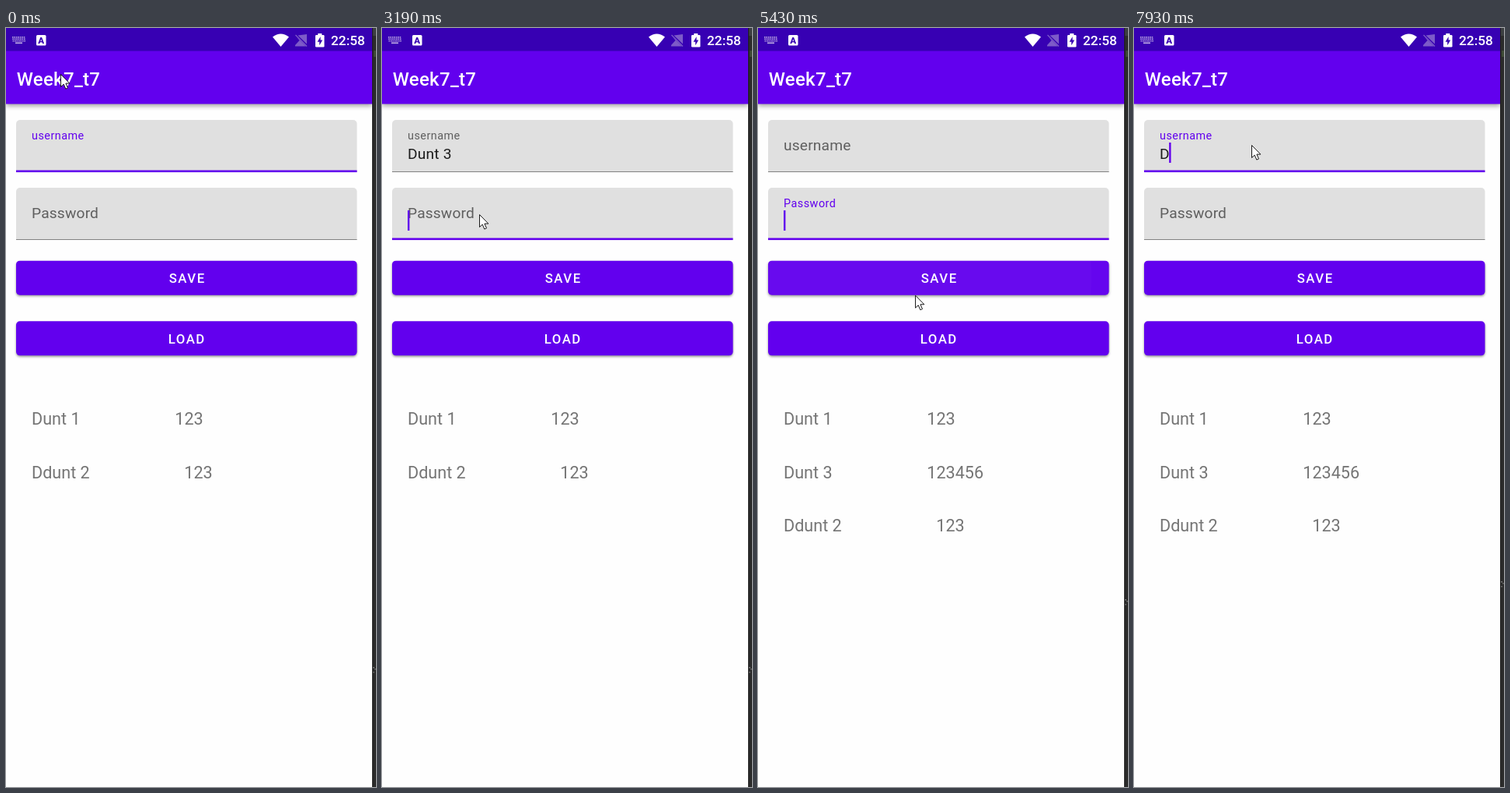
Write an HTML page with a canvas that moves like this. It is 476 px wide and 974 px high and loops after 8000 ms.

```html
<!DOCTYPE html>
<html lang="en">
<head>
<meta charset="utf-8">
<title>Login form</title>
<style>
html, body { margin: 0; width: 100%; height: 100%; overflow: hidden; background: #fefefe; }
canvas { display: block; }
</style>
</head>
<body>
<canvas id="stage" width="476" height="974"></canvas>
<script>
const ctx = document.getElementById('stage').getContext('2d');
const LOOP = 8000, PRIMARY = '#6200ee', FONT = 'Roboto, sans-serif';

// Each step: start time, username, password, focused field (0 or 1).
// A step also restarts the caret blink.
const steps = [
  [-720, '', '', 0],
  [1150, 'D', '', 0], [1240, 'Dd', '', 0], [1330, 'Ddu', '', 0], [1550, 'Ddun', '', 0],
  [1840, 'Ddu', '', 0], [1980, 'Dd', '', 0], [2160, 'D', '', 0], [2220, 'Du', '', 0],
  [2370, 'Dun', '', 0], [2400, 'Dunt', '', 0], [2550, 'Dunt ', '', 0], [2710, 'Dunt 3', '', 0],
  [3180, 'Dunt 3', '', 1], [3390, 'Dunt 3', '1', 1], [3450, 'Dunt 3', '12', 1],
  [3510, 'Dunt 3', '123', 1], [3810, 'Dunt 3', '1234', 1], [4000, 'Dunt 3', '12345', 1],
  [4190, 'Dunt 3', '123456', 1], [4980, 'Dunt 3', '123456', 1],
  [5005, '', '', 1],
  [7010, '', '', 0], [7500, 'D', '', 0], [7550, 'Di', '', 0], [7930, 'D', '', 0]
];

// Pointer path: time, x, y
const path = [
  [30, 70, 59], [440, 105, 161], [2720, 105, 161], [3080, 125, 239], [4190, 125, 239],
  [4550, 176, 314], [4850, 203, 323], [5400, 203, 323], [5810, 190, 583], [5990, 192, 585],
  [6200, 255, 560], [6400, 195, 380], [6520, 166, 300], [6640, 160, 220],
  [6780, 151, 150], [8000, 151, 150]
];

const clamp = v => Math.max(0, Math.min(1, v));
const mix = (a, b, p) => a + (b - a) * p;
const progress = (t, start, length) => clamp((t - start) / length);

// cubic-bezier(.4, 0, .2, 1)
function ease(x) {
  let lo = 0, hi = 1, s = .5;
  for (let i = 0; i < 16; i++) {
    s = (lo + hi) / 2;
    const at = 1.2 * s * (1 - s) ** 2 + .6 * s * s * (1 - s) + s ** 3;
    if (at < x) lo = s; else hi = s;
  }
  return s * s * (3 - 2 * s);
}

function pointerAt(t) {
  const i = path.findIndex(p => p[0] > t);
  if (i < 0) return path[path.length - 1].slice(1);
  if (i === 0) return path[0].slice(1);
  const [a, b] = [path[i - 1], path[i]], p = (t - a[0]) / (b[0] - a[0]);
  return [mix(a[1], b[1], p), mix(a[2], b[2], p)];
}

function rect(x, y, w, h, color) {
  ctx.fillStyle = color;
  ctx.fillRect(x, y, w, h);
}

function round(x, y, w, h, r, color) {
  ctx.fillStyle = color;
  ctx.beginPath();
  ctx.roundRect(x, y, w, h, r);
  ctx.fill();
}

function shape(d, color) {
  ctx.fillStyle = color;
  ctx.fill(new Path2D(d));
}

function text(str, x, y, size, color, weight = 400, spacing = 0) {
  ctx.font = `${weight} ${size}px ${FONT}`;
  ctx.letterSpacing = spacing + 'px';
  ctx.fillStyle = color;
  ctx.fillText(str, x, y);
  return ctx.measureText(str).width;
}

function shadowed(blur, dy, alpha, draw) {
  ctx.save();
  ctx.shadowColor = `rgba(0,0,0,${alpha})`;
  ctx.shadowBlur = blur;
  ctx.shadowOffsetY = dy;
  draw();
  ctx.restore();
}

function statusBar() {
  rect(0, 0, 471, 29.5, '#3700b3');
  for (let row = 0; row < 3; row++)
    for (let i = 0; i < 7; i++) rect(8 + i * 2.45 + row * .3, 11 + row * 2.4, 1.6, 1.6, '#b9a6e2');
  rect(12, 18.4, 9, 1.7, '#b9a6e2');
  round(39, 9, 12.5, 13.5, 1.5, '#fff');
  text('A', 41.3, 20, 11.5, '#3700b3', 900);
  shape('M343 11.5Q353.5 3.5 364 11.5L353.5 24Z', '#fff');
  shape('M387 8V20.5L375.5 9.5Z M374 11.5L386 23.5H372V22L377.5 16Z', '#7d5bc8');
  ctx.strokeStyle = '#7d5bc8';
  ctx.lineWidth = 1.3;
  ctx.stroke(new Path2D('M372.5 9L387 23.5'));
  round(398, 9, 11.5, 15.5, 1.2, '#fff');
  rect(401.3, 7, 5, 3, '#fff');
  shape('M404.6 11L400.6 17.8H403.2V22.3L407.2 15.6H404.6Z', '#3700b3');
  text('22:58', 418, 22, 17.3, '#fff', 500);
}

function appBar() {
  shadowed(6, 2, .38, () => rect(0, 29, 471, 68.5, PRIMARY));
  statusBar();
  text('Week7_t7', 13.7, 74, 24, '#fff', 500, .3);
}

function field(top, label, value, focused, raised, caretOn) {
  round(13, top, 438.5, 67, [5, 5, 0, 0], '#e0e0e0');
  if (focused) rect(13, top + 64.5, 438.5, 2.6, PRIMARY);
  else rect(13, top + 66, 438.5, 1, '#828282');
  text(label, 33, top + mix(39.3, 25.2, raised), mix(19.2, 14.4, raised),
    focused && raised > .1 ? PRIMARY : '#5f5f5f', 400, mix(.17, .48, raised));
  const width = text(value, 33, top + 50, 19.2, '#1d1d1d', 400, .17);
  if (focused && caretOn) rect(33 + width - (value ? .6 : 0), top + 29, 2.4, 26, PRIMARY);
}

function button(top, label, x, pressed = 0, ripple) {
  shadowed(3 + 3 * pressed, 1.6 + pressed, .4, () => round(13, top, 438.5, 44, 4.8, PRIMARY));
  if (pressed) {
    round(13, top, 438.5, 44, 4.8, `rgba(255,255,255,${.16 * pressed})`);
    if (ripple > 0) {
      ctx.save();
      ctx.beginPath();
      ctx.roundRect(13, top, 438.5, 44, 4.8);
      ctx.clip();
      ctx.beginPath();
      ctx.arc(208, top + 20.5, ripple, 0, 7);
      ctx.fillStyle = `rgba(255,255,255,${.18 * pressed})`;
      ctx.fill();
      ctx.restore();
    }
  }
  text(label, x, top + 28.5, 16.8, '#fff', 500, 1.5);
}

function list(saved) {
  const rows = [['Dunt 1', '123', 217.3], ['Ddunt 2', '123', 229.3]];
  if (saved) rows.splice(1, 0, ['Dunt 3', '123456', 217.3]);
  ctx.save();
  ctx.beginPath();
  ctx.rect(9, 440, 447, 206.5);
  ctx.clip();
  rows.forEach(([name, code, x], i) => {
    const y = 509.3 + i * 68.4;
    text(name, 33, y, 21.6, '#757575');
    text(code, x, y, 21.6, '#757575');
  });
  ctx.restore();
}

// Strip of the window behind the phone screen
function edge(t) {
  rect(471, 0, 5, 974, '#2b2b2b');
  rect(471, 0, 1, 974, '#1e1e1e');
  rect(472, 0, 4, 10, '#3c3f41');
  rect(473, 29, 3, 8, '#3d4a35');
  const y = t < 3400 ? 820 : t < 4030 ? 798 : t < 7000 ? 733 : 710;
  rect(472, y, 2, 1.5, '#777');
  rect(474, y + 2, 2, 1.5, '#666');
  rect(472, y + 6, 2, 1.5, '#666');
}

function pointer(t) {
  const [x, y] = pointerAt(t);
  ctx.save();
  ctx.translate(x + .5, y + .5);
  const arrow = new Path2D('M0 0V16L3.7 12.6L6.3 18.6L9 17.4L6.4 11.6H11.4Z');
  ctx.fillStyle = '#fff';
  ctx.fill(arrow);
  ctx.strokeStyle = '#1a1a1a';
  ctx.lineWidth = 1;
  ctx.stroke(arrow);
  ctx.restore();
}

function draw(t) {
  const [since, user, pass, focus] = steps.findLast(s => s[0] <= t);
  const caretOn = (t - since) % 1000 < 500;
  const tween = start => ease(progress(t, start, 167));
  const userRaised = 1 - tween(5005) + tween(7010);
  const passRaised = tween(3180) - tween(7010);
  const pressed = progress(t, 4940, 60) * (1 - progress(t, 5290, 160));
  const ripple = t < 4990 ? 0 : 10 + .49 * (t - 5000);

  rect(0, 0, 476, 974, '#fefefe');
  appBar();
  field(118, 'username', user, focus === 0, userRaised, caretOn);
  field(205, 'Password', pass, focus === 1, passRaised, caretOn);
  button(298.7, 'SAVE', 209.7, pressed, ripple);
  button(376.3, 'LOAD', 208.7);
  list(t >= 5005);
  edge(t);
  pointer(t);
}

const begin = performance.now();
function tick() {
  draw((performance.now() - begin) % LOOP);
  requestAnimationFrame(tick);
}
tick();
</script>
</body>
</html>
```
